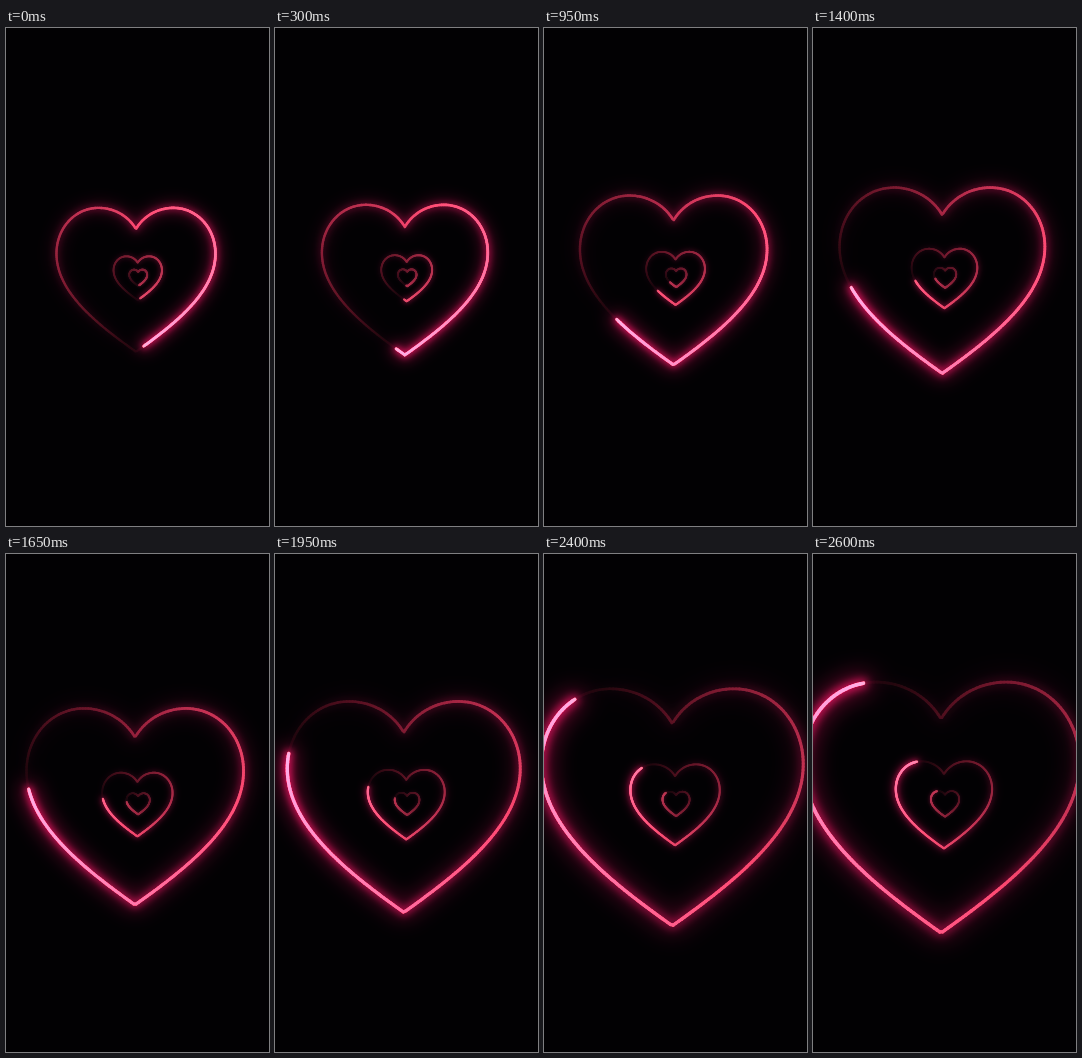
Write an HTML page with a canvas that moves like this. It is 263 px wide and 498 px high and loops after 2.65 s.

```html
<!DOCTYPE html>
<html lang="en">
<head>
<meta charset="utf-8">
<title>Neon hearts</title>
<style>
  html, body { margin: 0; width: 100%; height: 100%; overflow: hidden; background: #020103; }
  canvas { display: block; width: 100vw; height: 100vh; }
</style>
</head>
<body>
<canvas id="stage" width="263" height="498"></canvas>
<script>
const W = 263, H = 498, PAD = 60, LOOP = 2650, STEP = 50, SEGMENTS = 240;
const ctx = document.getElementById('stage').getContext('2d');

const layer = document.createElement('canvas');
layer.width = W + 2 * PAD;
layer.height = H;
const pen = layer.getContext('2d');
pen.lineCap = 'round';

// Heart outline of width 1000, clockwise from the notch
const outline = document.createElementNS('http://www.w3.org/2000/svg', 'path');
outline.setAttribute('d', `M0 -305
  C50 -390 140 -438 235 -438 C385 -438 500 -310 500 -150
  C500 90 250 290 0 467
  C-250 290 -500 90 -500 -150 C-500 -310 -385 -438 -235 -438
  C-140 -438 -50 -390 0 -305Z`);
const perimeter = outline.getTotalLength();

// Each heart approaches the viewer: width = size / (depth - step)
const hearts = [
  { size: 2520, depth: 140 },
  { size: 4960, depth: 102.5 },
  { size: 19011, depth: 119.6 }
];

const rgb = (...c) => `rgb(${c.map(x => Math.min(255, Math.round(x))).join()})`;

// Layers of the neon tube: line width and blur grow with the heart's width
const tube = [
  { color: v => rgb(110 * v ** 1.5, 6 * v ** 1.5, 44 * v ** 1.5),
    line: w => 1 + 0.06 * w, blur: w => 1 + 0.04 * w },
  { color: v => rgb(150 * v ** 1.3, 14 * v ** 1.3, 62 * v ** 1.3),
    line: w => 0.5 + 0.033 * w, blur: w => 1.5 + 0.01 * w },
  { color: v => rgb(260 * v, 40 * v + 120 * v ** 2.5, 75 * v + 85 * v ** 2.5),
    line: w => 1.7 + 0.007 * w, blur: () => 0.7 }
];

// Points from the bright head back along the fading tail
function trace(head) {
  return Array.from({ length: SEGMENTS + 1 }, (_, i) => {
    const f = (head - i / SEGMENTS + 1) % 1;
    return outline.getPointAtLength(f * perimeter);
  });
}

function strokeTrail(points, w, level, { color, line, blur }) {
  const k = w / 1000, cx = PAD + 132.5 - 0.016 * w, cy = 249.5;
  pen.globalCompositeOperation = 'source-over';
  pen.clearRect(0, 0, layer.width, H);
  pen.globalCompositeOperation = 'lighten';
  for (let i = SEGMENTS - 1; i >= 0; i--) {
    const a = points[i], b = points[i + 1];
    const v = (1 - i / SEGMENTS) ** 0.7;
    pen.strokeStyle = color(v * level);
    pen.lineWidth = line(w) * (0.7 + 0.3 * v);
    pen.beginPath();
    pen.moveTo(cx + a.x * k, cy + a.y * k);
    pen.lineTo(cx + b.x * k, cy + b.y * k);
    pen.stroke();
  }
  ctx.filter = `blur(${blur(w)}px)`;
  ctx.drawImage(layer, -PAD, 0);
  ctx.filter = 'none';
}

function draw(step) {
  ctx.globalCompositeOperation = 'source-over';
  ctx.fillStyle = '#020103';
  ctx.fillRect(0, 0, W, H);
  ctx.globalCompositeOperation = 'lighter';
  const points = trace(0.4805 + 0.0081 * step);
  for (const { size, depth } of hearts) {
    const w = size / (depth - step);
    const level = Math.min(1, 0.4 + w / 200);
    for (const part of tube) strokeTrail(points, w, level, part);
  }
}

const start = performance.now();
let shown = -1;
function tick() {
  const t = (performance.now() - start) % LOOP;
  const step = Math.max(0, Math.floor(t / STEP) - 1);
  if (step !== shown) draw(shown = step);
  requestAnimationFrame(tick);
}
tick();
</script>
</body>
</html>
```
